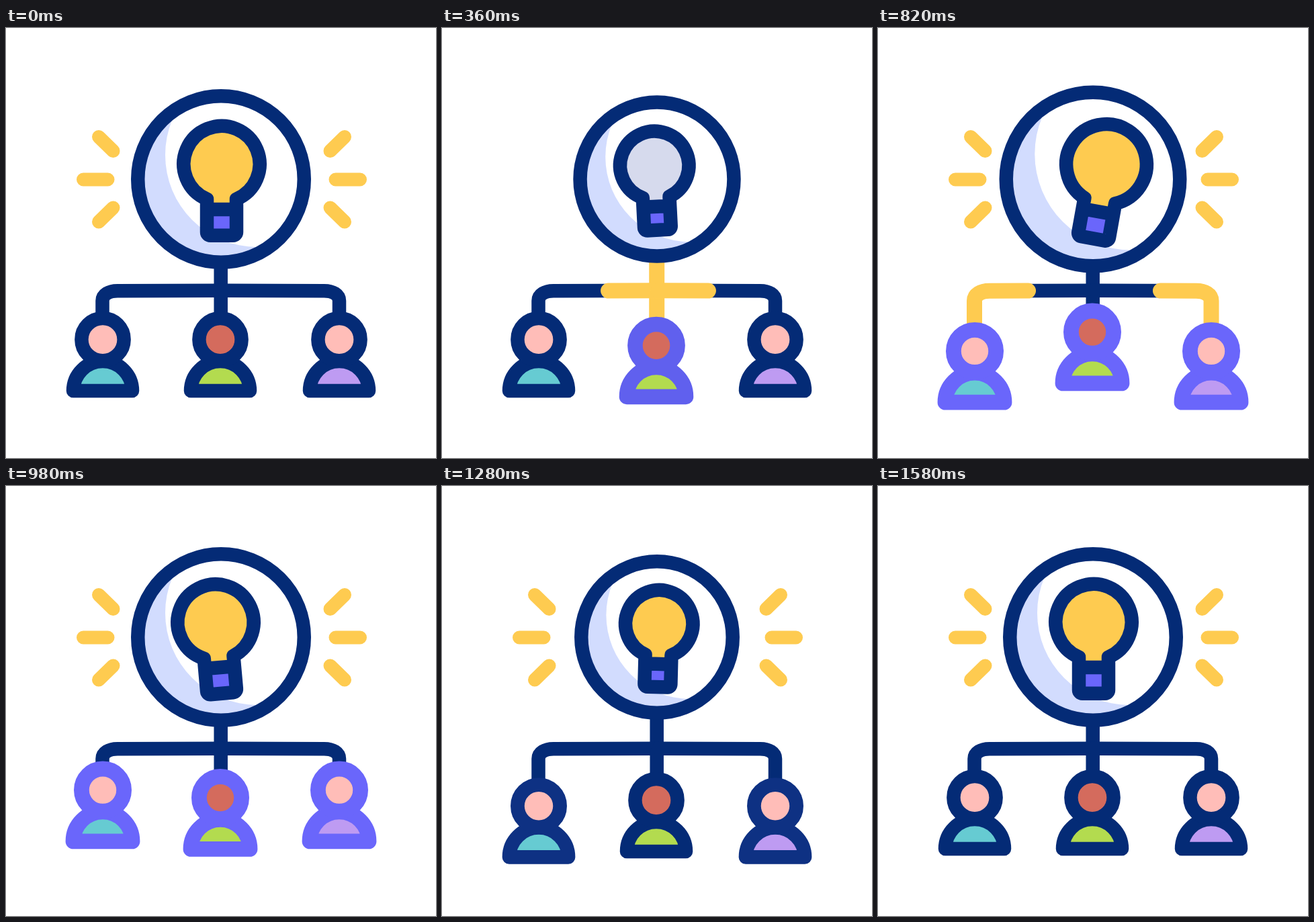
Animation of 640 by 640 pixels, one loop 1900 ms. Source, as an HTML page with a canvas:

```html
<!DOCTYPE html>
<html lang="en">
<head>
<meta charset="utf-8">
<title>Idea network</title>
<style>
  html, body { margin: 0; width: 100%; height: 100%; overflow: hidden; background: #fff; }
  canvas { display: block; width: 640px; height: 640px; }
</style>
</head>
<body>
<canvas id="stage" width="640" height="640"></canvas>
<script>
const ctx = document.getElementById('stage').getContext('2d');
const LOOP = 1900;
const SIDE_DELAY = 160;
const LINE = 20.5;
const NAVY = [4, 43, 118], PURPLE = [106, 102, 251];
const YELLOW = [254, 203, 80], PALE = [210, 220, 254];
const HUB = { x: 320, y: 225, r: 123.75 };

// Keyframes as [time, value], eased between neighbours.
const hubScale = [[120, 1], [445, .91], [755, 1.056], [980, 1], [1130, 1], [1290, .91], [1500, 1]];
const bulbTilt = [[120, 0], [445, -3.5], [755, 12.7], [1065, -9], [1300, 1.7], [1500, 0]];
const bulbOff = [[200, 0], [400, 1], [620, 1], [780, 0]];
const rayStart = [[120, 0], [300, 1]];
const rayEnd = [[640, 0], [800, 1]];
const trunkHead = [[120, 0], [330, 1]], trunkTail = [[590, 0], [800, 1]];
const armHead = [[240, 0], [560, 1]], armTail = [[670, 0], [1006, 1]];
const personDrop = [[200, 0], [590, 24], [845, -12], [1115, 12.5], [1380, 0]];
const personTint = [[200, 0], [400, 1], [1000, 1], [1150, 0]];

function at(keys, t) {
  if (t <= keys[0][0]) return keys[0][1];
  for (let i = 1; i < keys.length; i++) {
    const [t0, a] = keys[i - 1], [t1, b] = keys[i];
    if (t < t1) {
      const p = (t - t0) / (t1 - t0);
      return a + (b - a) * p * p * (3 - 2 * p);
    }
  }
  return keys[keys.length - 1][1];
}

const rgb = c => `rgb(${c.map(Math.round).join()})`;
const mix = (a, b, k) => rgb(a.map((v, i) => v + (b[i] - v) * k));

function stroke(color, width = LINE) {
  ctx.strokeStyle = color;
  ctx.lineWidth = width;
  ctx.stroke();
}

function fill(color) {
  ctx.fillStyle = color;
  ctx.fill();
}

function circle(x, y, r) {
  ctx.beginPath();
  ctx.arc(x, y, r, 0, 7);
}

function trunkPath() {
  ctx.beginPath();
  ctx.moveTo(319.7, 340);
  ctx.lineTo(319.7, 455);
}

// dir is -1 for the left arm and 1 for the right one.
function armPath(dir) {
  const x = dir < 0 ? 143.5 : 496;
  ctx.beginPath();
  ctx.moveTo(322, 390.8);
  ctx.lineTo(x - dir * 22.5, 391.2);
  ctx.bezierCurveTo(x - dir * 9.5, 391.2, x, 397, x, 406);
  ctx.lineTo(x, 455);
}

function trimmed(path, length, from, to) {
  if (to <= from || from >= 1) return;
  path();
  ctx.setLineDash([(to - from) * length, 2000]);
  ctx.lineDashOffset = -from * length;
  stroke(rgb(YELLOW), 23);
  ctx.setLineDash([]);
}

function drawConnectors(t) {
  const arms = [-1, 1].map(dir => () => armPath(dir));
  for (const path of [trunkPath, ...arms]) {
    path();
    stroke(rgb(NAVY));
  }
  trimmed(trunkPath, 115, at(trunkTail, t), at(trunkHead, t));
  for (const path of arms) trimmed(path, 232, at(armTail, t), at(armHead, t));
}

function drawRays(t) {
  const shown = t > 500;
  const a = shown ? 0 : at(rayStart, t);
  const b = shown ? at(rayEnd, t) : 1;
  if (b <= a) return;
  const rays = [[159.5, 183, 138, 162], [151.5, 225.5, 115, 225.5], [159.5, 267.5, 138, 288.5]];
  ctx.beginPath();
  for (const [x0, y0, x1, y1] of rays) {
    const px = k => x0 + (x1 - x0) * k, py = k => y0 + (y1 - y0) * k;
    for (const flip of [x => x, x => 642 - x]) {
      ctx.moveTo(flip(px(a)), py(a));
      ctx.lineTo(flip(px(b)), py(b));
    }
  }
  stroke(rgb(YELLOW), 20);
}

function drawHub(scale) {
  const { x, y } = HUB, r = HUB.r * scale;
  circle(x, y, r);
  fill(rgb(PALE));
  ctx.save();
  ctx.clip();
  circle(x + 54 * scale, y - 36 * scale, 137 * scale);
  fill('#fff');
  ctx.restore();
  circle(x, y, r);
  stroke(rgb(NAVY));
}

function drawBulb(scale, tilt, off) {
  const left = 299, right = 343, neck = 254.7, bar = 270, foot = 308.7;
  const open = Math.atan2(neck - 202.5, 22);

  // Shapes scale with the hub while line weights stay constant.
  function shape(build) {
    ctx.save();
    ctx.translate(HUB.x, HUB.y);
    ctx.scale(scale, scale);
    ctx.translate(1, 79);
    ctx.rotate(tilt * Math.PI / 180);
    ctx.translate(-321, -304);
    ctx.beginPath();
    build();
    ctx.restore();
  }

  shape(() => {
    ctx.arc(321, 202.5, 56.6, Math.PI - open, open);
    ctx.lineTo(right, bar);
    ctx.lineTo(left, bar);
    ctx.closePath();
  });
  fill(mix(YELLOW, PALE, off));
  shape(() => ctx.rect(left, bar, right - left, foot - bar));
  fill(rgb(PURPLE));
  shape(() => {
    ctx.arc(321, 202.5, 56.6, Math.PI - open, open);
    ctx.arcTo(right, foot, left, foot, 5);
    ctx.arcTo(left, foot, left, neck, 5);
    ctx.closePath();
    ctx.moveTo(left, bar);
    ctx.lineTo(right, bar);
  });
  stroke(rgb(NAVY));
}

function drawPerson(x, skin, shirt, t) {
  const dy = at(personDrop, t), tint = at(personTint, t);
  const color = mix(NAVY, PURPLE, tint), width = LINE + 2.3 * tint;
  ctx.beginPath();
  ctx.arc(x, 540 + dy, 44, Math.PI, 0);
  ctx.closePath();
  fill(shirt);
  stroke(color, width);
  circle(x, 463.7 + dy, 31.6);
  fill(skin);
  stroke(color, width);
}

function draw(t) {
  ctx.fillStyle = '#fff';
  ctx.fillRect(0, 0, 640, 640);
  ctx.lineCap = ctx.lineJoin = 'round';
  const scale = at(hubScale, t);
  drawConnectors(t);
  drawRays(t);
  drawHub(scale);
  drawBulb(1 + 1.28 * (scale - 1), at(bulbTilt, t), at(bulbOff, t));
  drawPerson(144, '#ffbdb8', '#66cbd2', t - SIDE_DELAY);
  drawPerson(319, '#d46b5d', '#b3db4f', t);
  drawPerson(496, '#ffbdb8', '#be9bf2', t - SIDE_DELAY);
}

const began = performance.now();
function frame() {
  draw((performance.now() - began) % LOOP);
  requestAnimationFrame(frame);
}
frame();
</script>
</body>
</html>
```
